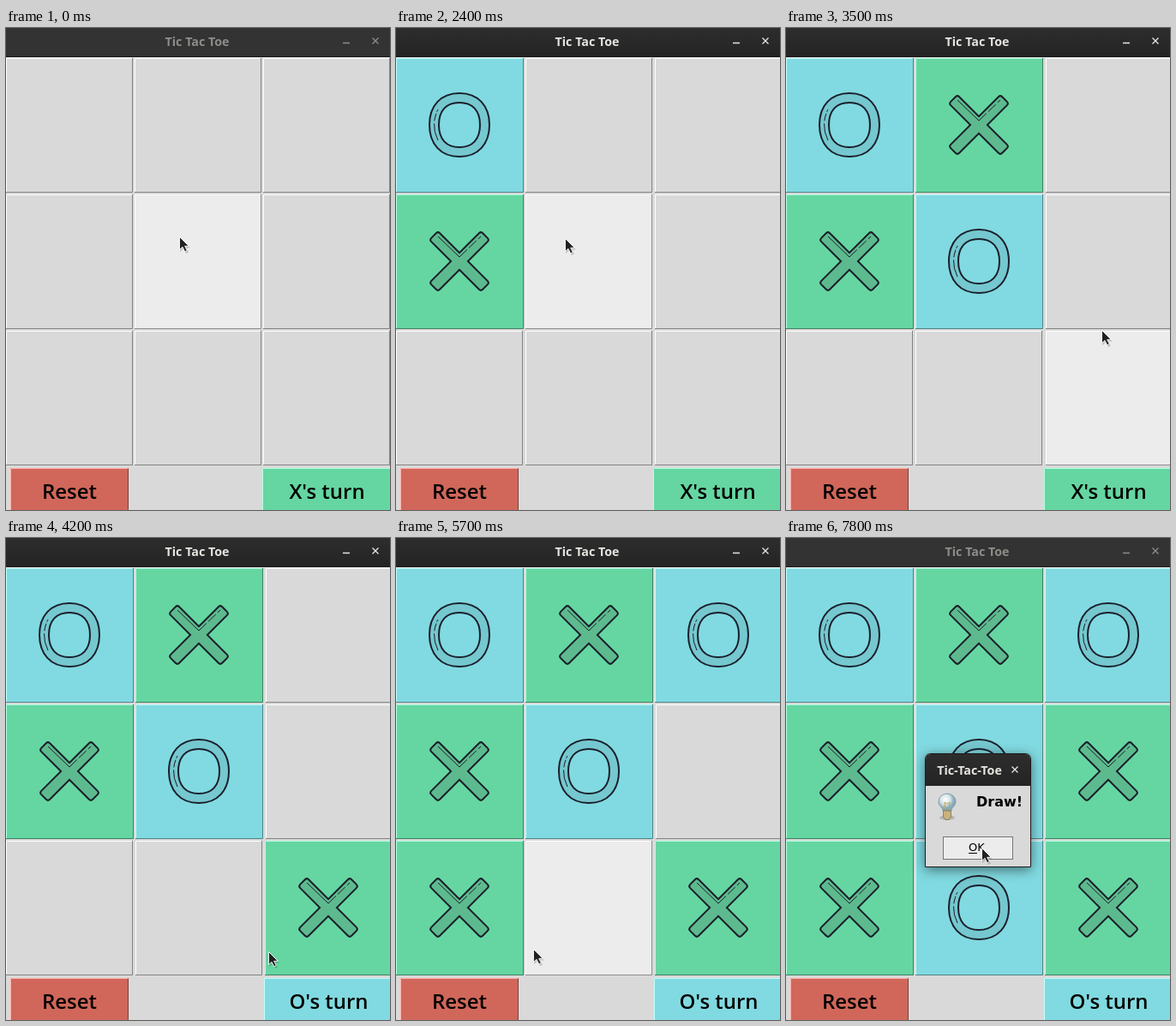
Animation of 448 by 562 pixels, one loop 8000 ms. Source, as an HTML page:

```html
<!DOCTYPE html>
<html lang="en">
<head>
<meta charset="utf-8">
<title>Tic Tac Toe</title>
<style>
html, body { margin: 0; width: 100%; height: 100%; overflow: hidden; background: #d9d9d9; }
svg { display: block; width: 448px; height: 562px; }
text { text-anchor: middle; }
.title { font: 700 14.3px "Open Sans", "Noto Sans", sans-serif; }
.big { font: 600 24px "Open Sans", "Noto Sans", sans-serif; }
.msg { font: 700 16px "DejaVu Sans", sans-serif; }
.ok { font: 13px "DejaVu Sans", sans-serif; }
.thin { fill: none; stroke: #1a1e2b; }
.line { fill: none; stroke-width: 1.3; }
.box { filter: drop-shadow(0 3px 7px rgba(0,0,0,.5)); }
</style>
</head>
<body>
<svg viewBox="0 0 448 562">
  <defs>
    <linearGradient id="bar" x2="0" y2="1">
      <stop stop-color="#2d2d2d"/><stop offset="1" stop-color="#242424"/>
    </linearGradient>
    <radialGradient id="glass" cx=".4" cy=".35">
      <stop stop-color="#fff"/><stop offset=".55" stop-color="#d8e6ea"/><stop offset="1" stop-color="#87a9b8"/>
    </radialGradient>
    <rect id="edge" x="-8" y="-43.400" width="16" height="86.800" rx="4" fill="#1a1e2b"/>
    <rect id="core" x="-6" y="-41.400" width="12" height="82.800" rx="2" fill="#5dba8e"/>
    <path id="ring" fill="none" d="M0-31.500C18.500-31.500 29.500-19.500 29.500 0S18.500 31.500 0 31.500S-29.500 19.500-29.500 0S-18.500-31.500 0-31.500Z"/>
    <g id="X">
      <use href="#edge" transform="rotate(45)"/><use href="#edge" transform="rotate(-45)"/>
      <use href="#core" transform="rotate(45)"/><use href="#core" transform="rotate(-45)"/>
      <path class="thin" d="M-25-29L0-5L25-29" stroke-dasharray="47 3 12 3"/>
    </g>
    <g id="O">
      <use href="#ring" stroke="#1a1e2b" stroke-width="13"/>
      <use href="#ring" stroke="#75c8cf" stroke-width="9"/>
      <path class="thin" d="M-25-18Q-34 0-25 18" stroke-dasharray="3 2 9 3 30"/>
    </g>
  </defs>

  <rect width="448" height="562" fill="#d9d9d9"/>
  <g id="cells"></g>

  <rect x="5" y="513" width="138" height="52" fill="#d0675a"/>
  <path d="M5.500 562V513.500H142" fill="none" stroke="#ffb3ac"/>
  <path d="M142.500 514V562" stroke="#7d3e36"/>
  <text class="big" x="74" y="549">Reset</text>
  <g id="turn">
    <rect id="turnBg" y="513" width="150" height="50"/>
    <path id="turnEdge" d="M.5 562V513.500H150" fill="none"/>
    <text id="turnText" class="big" x="75.500" y="549"></text>
  </g>

  <rect id="head" width="448" height="34"/>
  <path d="M0 33.500H448" stroke="#141414"/>
  <g id="headInk">
    <text class="title" x="223" y="21" fill="currentColor">Tic Tac Toe</text>
    <path class="line" stroke="currentColor" d="M393 17.500H401M427.500 11.500L434.500 18.500M434.500 11.500L427.500 18.500"/>
  </g>

  <g id="dialog">
    <path class="box" d="M162.500 383.500V258Q162.500 251.500 169 251.500H279Q285.500 251.500 285.500 258V383.500Z" fill="#d9d9d9" stroke="#1c1c1c"/>
    <path d="M163 289V258Q163 252 169 252H279Q285 252 285 258V289Z" fill="url(#bar)"/>
    <text class="title" x="214" y="276" fill="#e6e4df">Tic-Tac-Toe</text>
    <path class="line" stroke="#e6e4df" d="M263.500 266.500L270.500 273.500M270.500 266.500L263.500 273.500"/>
    <ellipse cx="188" cy="326" rx="9" ry="3" fill="#b5b5b5"/>
    <path d="M183 318C183 314 178 313 178 307A10 9 0 0 1 198 307C198 313 193 314 193 318Z" fill="url(#glass)" stroke="#7896a3" stroke-width=".8"/>
    <path d="M186 317L185 308L188 310L191 308L190 317" fill="none" stroke="#c9a24c"/>
    <path d="M183.500 318H192.500V325L190 328.500H186L183.500 325Z" fill="#c9b27c" stroke="#6f6a58" stroke-width=".7"/>
    <text class="msg" x="249" y="313">Draw!</text>
    <rect id="okBg" x="183" y="348" width="82" height="27"/>
    <rect x="183.500" y="348.500" width="81" height="26" fill="none" stroke="#000" stroke-dasharray="1 1"/>
    <text class="ok" x="222.500" y="365">OK</text>
    <path d="M213 367.500H223" stroke="#000"/>
  </g>

  <g id="cursor">
    <path d="M1 2V18L5 14.500L8 20L11 18.500L8.500 13.500H13Z" opacity=".18"/>
    <path d="M.5.5V15.500L4 12.300L6.700 17.800L9.300 16.500L6.700 11.300H11.300Z" fill="#222" stroke="#fff" stroke-width=".9"/>
  </g>
</svg>
<script>
const LOOP = 8000, STEP = 100, REPLY = 700, ACTIVE = 500, POPUP = 6700;
const GRAY = '#d9d9d9', HOVER = '#ececec';
const FACE = { X: '#65d6a1', O: '#81dae1' };
const LIGHT = { X: '#b2ffe1', O: '#c0ffff' };

// the player's clicks; the computer answers after REPLY
const turns = [
  { at: 700, x: 3, o: 0 }, { at: 2800, x: 1, o: 4 }, { at: 3800, x: 8, o: 2 },
  { at: 5400, x: 6, o: 7 }, { at: 6500, x: 5 }
];

// pointer tip: time, x, y
const stops = [
  [0, 203, 243], [500, 75, 268], [700, 82, 272], [900, 460, 300], [1900, 460, 300],
  [2400, 198, 245], [2800, 235, 171], [3500, 369, 352], [3800, 372, 425],
  [4500, 259, 525], [4900, 233, 438], [5400, 78, 436], [5700, 161, 479],
  [6400, 372, 275], [7100, 262, 426], [7800, 229, 361], [LOOP, 229, 361]
];

const $ = id => document.getElementById(id);
const set = (el, attrs) => { for (const k in attrs) el.setAttribute(k, attrs[k]); };
const inside = ([px, py], x, y, w, h) => px >= x && px < x + w && py >= y && py < y + h;

function add(parent, tag, attrs = {}) {
  const el = document.createElementNS('http://www.w3.org/2000/svg', tag);
  set(el, attrs);
  return parent.appendChild(el);
}

function pointer(t) {
  const i = stops.findIndex(s => s[0] > t);
  const [t0, x0, y0] = stops[i - 1], [t1, x1, y1] = stops[i];
  const k = (t - t0) / (t1 - t0);
  return [Math.round(x0 + (x1 - x0) * k), Math.round(y0 + (y1 - y0) * k)];
}

const cells = Array.from({ length: 9 }, (_, i) => {
  const turn = turns.find(m => m.x === i || m.o === i);
  const mark = turn.x === i ? 'X' : 'O';
  const g = add($('cells'), 'g');
  return {
    g, mark, at: turn.at + (mark === 'O' ? REPLY : 0),
    col: i % 3, y: 35 + 159 * Math.floor(i / 3),
    face: add(g, 'rect', { height: 157 }),
    light: add(g, 'path', { fill: 'none' }),
    dark: add(g, 'path', { fill: 'none', stroke: '#000', 'stroke-opacity': .4 }),
    icon: add(g, 'use', { href: '#' + mark, x: 74, y: 78 })
  };
});

function draw(time) {
  const t = Math.floor(time % LOOP / STEP) * STEP;
  const tip = pointer(t);
  const popup = t >= POPUP, active = t >= ACTIVE && !popup;
  // a column grows by a pixel once it holds a mark
  const first = t >= turns[0].at, second = t >= turns[1].at;

  for (const c of cells) {
    const on = t >= c.at, w = on ? 149 : 148;
    const x = (first ? 151 : 150) * c.col + (second && !on && c.col === 2);
    const hover = !popup && inside(tip, x - 1, c.y - 1, w + 2, 159);
    set(c.g, { transform: `translate(${x} ${c.y})` });
    set(c.face, { width: w, fill: on ? FACE[c.mark] : hover ? HOVER : GRAY });
    set(c.light, { d: `M.5 156V.5H${w - 1}`, stroke: on ? LIGHT[c.mark] : '#fff' });
    set(c.dark, { d: `M0 156.5H${w - .5}V0` });
    c.icon.style.display = on ? '' : 'none';
  }

  const who = cells.filter(c => t >= c.at).length % 2 ? 'O' : 'X';
  set($('turn'), { transform: `translate(${299 + first + second})` });
  set($('turnBg'), { fill: FACE[who] });
  set($('turnEdge'), { stroke: LIGHT[who] });
  $('turnText').textContent = who + "'s turn";

  set($('head'), { fill: active ? 'url(#bar)' : '#333' });
  set($('headInk'), { color: active ? '#e6e4df' : '#8e8c88' });
  $('dialog').style.display = popup ? '' : 'none';
  set($('okBg'), { fill: inside(tip, 183, 348, 82, 27) ? HOVER : GRAY });
  set($('cursor'), { transform: `translate(${tip[0] - 1} ${tip[1]})` });
}

const start = performance.now();
function tick() {
  draw(performance.now() - start);
  requestAnimationFrame(tick);
}
tick();
</script>
</body>
</html>
```
